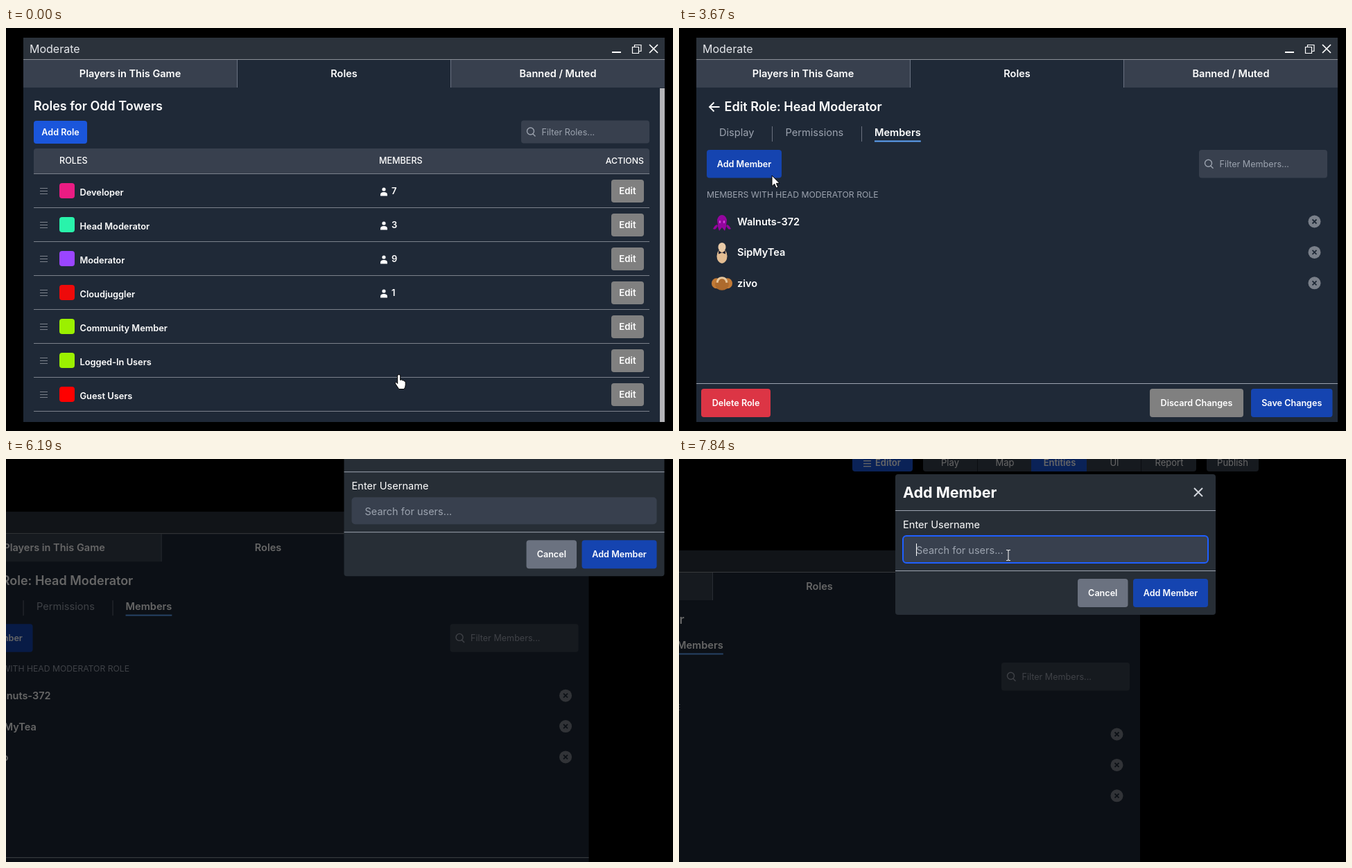
These frames come from a looping animation (962x582 px, 8 s). An HTML page with a canvas:

```html
<!DOCTYPE html>
<html lang="en">
<head>
<meta charset="utf-8">
<title>Moderate</title>
<style>
html, body { margin: 0; height: 100%; overflow: hidden; background: #000; }
canvas { display: block; }
</style>
</head>
<body>
<canvas id="stage" width="962" height="582"></canvas>
<script>
const c = document.getElementById('stage').getContext('2d');
const PANEL = '#1f2937', FIELD = '#38404e', GRAY = '#9ca3af', BLUE = '#1544b0', BTN = '#808080', MINT = '#29f3ab';

// ---- drawing helpers ----
function rect(x, y, w, h, fill) { c.fillStyle = fill; c.fillRect(x, y, w, h); }

function box(x, y, w, h, fill, r = 4, stroke, lw = 1) {
  c.beginPath();
  c.roundRect(x, y, w, h, r);
  c.fillStyle = fill;
  c.fill();
  if (stroke) { c.strokeStyle = stroke; c.lineWidth = lw; c.stroke(); }
}

function text(s, x, y, size, weight = 400, fill = '#fff', align = 'left') {
  c.font = `${weight} ${size}px Inter, Roboto, sans-serif`;
  c.textAlign = align;
  c.fillStyle = fill;
  c.fillText(s, x, y);
}

function path(d, stroke, lw = 1.5, fill) {
  const p = new Path2D(d);
  if (fill) { c.fillStyle = fill; c.fill(p); }
  if (stroke) { c.strokeStyle = stroke; c.lineWidth = lw; c.stroke(p); }
}

function oval(x, y, rx, ry, fill) {
  c.beginPath();
  c.ellipse(x, y, rx, ry, 0, 0, 7);
  c.fillStyle = fill;
  c.fill();
}

function at(x, y, draw) { c.save(); c.translate(x, y); draw(); c.restore(); }

function button(label, x, y, w, h, fill, size = 12.6) {
  box(x, y, w, h, fill);
  text(label, x + w / 2, y + h / 2 + 4.6, size, 600, '#fff', 'center');
}

function filter(label, x, y, h) {
  box(x, y, 185, h, FIELD);
  at(x + 14, y + h / 2, () => path('M4.5-1A5 5 0 1 1-5.5-1A5 5 0 1 1 4.5-1M3 3L6.5 6.5', GRAY, 1.4));
  text(label, x + 29.5, y + h / 2 + 4.6, 12.6, 400, GRAY);
}

// ---- window ----
function frame() {
  rect(25, 14, 925, 555, PANEL);
  rect(25, 14, 925, 31, '#2b323b');
  text('Moderate', 34, 36, 16, 400, '#e5e7eb');
  rect(874, 34, 13, 2, '#fff');
  path('M906.5 27V24.5H916V33.5H913M903.5 27.5H912.5V36.5H903.5Z', '#fff', 1.2);
  path('M928 24L940 36M940 24L928 36', '#fff', 1.7);
  rect(25, 45, 925, 1, '#8b9097');
  rect(25, 46, 308, 40, FIELD);
  rect(642, 46, 308, 40, FIELD);
  rect(333, 46, 1, 40, '#687080');
  rect(641, 46, 1, 40, '#687080');
  text('Players in This Game', 179, 71, 14.5, 600, '#fff', 'center');
  text('Roles', 487.5, 71, 14.5, 600, '#fff', 'center');
  text('Banned / Muted', 796, 71, 14.5, 600, '#fff', 'center');
}

const roles = [
  ['Developer', '#ea1c83', 7], ['Head Moderator', MINT, 3], ['Moderator', '#9a45ff', 9],
  ['Cloudjuggler', '#ee0a0a', 1], ['Community Member', '#9bf000'],
  ['Logged-In Users', '#9bf000'], ['Guest Users', '#ff0000']
];

function roleList() {
  text('Roles for Odd Towers', 40, 119, 18, 600);
  button('Add Role', 40, 134, 77, 33, '#1a56db');
  filter('Filter Roles...', 743, 133.5, 33);
  box(40, 174, 888, 36, FIELD, [4, 4, 0, 0]);
  text('ROLES', 77, 196, 12.6, 500);
  text('MEMBERS', 538, 196, 12.6, 500);
  text('ACTIONS', 920, 196, 12.3, 500, '#fff', 'right');
  rect(40, 210, 888, 1, '#7b818b');
  roles.forEach(([name, color, count], i) => at(0, 49 * i, () => {
    for (const y of [231, 235, 239]) rect(49, y, 11, 1, '#7b818b');
    box(77, 224, 22, 22, color);
    text(name, 106.5, 241.5, 12.8, 600);
    if (count) {
      oval(545, 233, 2.6, 2.6, '#fff');
      path('M540 242.5V240.5Q540 237 545 237T550 240.5V242.5Z', 0, 0, '#fff');
      text(count, 556, 240, 13, 600);
    }
    button('Edit', 873, 219, 47, 33, BTN, 13.2);
    rect(40, 259, 888, 1, '#7b818b');
  }));
  rect(943, 87, 7, 482, '#b4b4b8');
}

function editHead(active, tabs, seps) {
  path('M58.5 114H44M50.5 107.5L44 114L50.5 120.5', '#fff', 1.8);
  text('Edit Role: Head Moderator', 65.5, 120, 18, 600);
  ['Display', 'Permissions', 'Members'].forEach((s, i) => {
    const on = i === active;
    text(s, tabs[i], 155.5, 14.6, on ? 600 : 400, on ? '#fff' : GRAY);
    if (on) rect(tabs[i], 162.5, c.measureText(s).width, 2, '#60a5fa');
  });
  for (const x of seps) rect(x, 142, 1, 22, '#6b7280');
  rect(25, 513, 925, 1, GRAY);
  button('Delete Role', 32, 521, 100, 41, '#dc3545');
  button('Discard Changes', 679, 521, 135, 41, BTN);
  button('Save Changes', 825, 521, 117.5, 41, BLUE);
}

function displayTab() {
  editHead(0, [58, 156.5, 285.5], [137, 266]);
  text('Role Name', 43.5, 190, 12.5);
  box(40.5, 199.5, 894, 33.5, FIELD, 4, '#6b7280');
  text('Head Moderator', 52, 221, 14.2);
  text('Role Color', 43.5, 262, 12.5);
  box(40.5, 270.5, 894, 33.5, FIELD, 4, '#6b7280');
  box(40.5, 270.5, 41, 33.5, '#6b7280', [4, 0, 0, 4]);
  rect(81, 270, 1.5, 34, '#e5e7eb');
  box(51.5, 278.5, 19, 18, MINT, 0, '#c8ccd2');
  text('#29f3ab', 94.5, 292, 14.4);
}

const members = ['Walnuts-372', 'SipMyTea', 'zivo'];
const avatars = [
  () => {
    path('M-13 10Q-9 13-6 5L-7-3Q-5-10 0-10T7-3L6 5Q9 13 13 10Q10 4 7 4L4 13L0 8L-4 13L-7 4Q-10 4-13 10Z', 0, 0, '#94069f');
    oval(-3, 0, 1.2, 2, '#d84be0');
    oval(3, 0, 1.2, 2, '#d84be0');
  },
  () => {
    oval(0, 5, 7.5, 10.5, '#e3bd92');
    oval(0, -8, 5.5, 6.5, '#e9cba8');
    path('M-5-3L0 0L5-3V2L0 0L-5 2Z', 0, 0, '#252432');
  },
  () => {
    oval(-8, 0, 7, 7.5, '#c27a36');
    oval(8, 0, 7, 7.5, '#c27a36');
    oval(0, 1, 10, 9, '#ad6a2d');
    path('M-7-1Q-6-8 0-8T7-1', '#e7c69b', 3);
  }
];

function membersTab() {
  editHead(2, [58, 153.5, 282], [134, 263]);
  button('Add Member', 40, 176, 108, 40.5, BLUE);
  filter('Filter Members...', 750, 176, 40.5);
  text('MEMBERS WITH HEAD MODERATOR ROLE', 40, 245, 12.2, 400, GRAY);
  members.forEach((name, i) => at(0, 44.4 * i, () => {
    at(62, 280, avatars[i]);
    text(name, 84, 285, 14.5, 600);
    oval(916.5, 279.5, 9, 9, '#7a808a');
    path('M913.5 276.5L919.5 282.5M919.5 276.5L913.5 282.5', PANEL, 1.8);
  }));
}

// Strip of buttons above the window, reached only by panning
function toolbar() {
  box(535, -132, 87, 32, '#1a56db');
  for (const y of [-116, -112, -108]) rect(551, y, 11, 1.3, '#fff');
  text('Editor', 568, -108, 13, 600);
  box(637, -132, 394, 32, FIELD);
  rect(793, -132, 80, 32, '#1a56db');
  rect(715, -132, 1, 32, '#1b212b');
  rect(951, -132, 1, 32, '#1b212b');
  ['Play', 'Map', 'Entities', 'UI', 'Report'].forEach((s, i) =>
    text(s, 676 + 79 * i, -108, 13, i === 2 ? 600 : 400, '#fff', 'center'));
  box(1046, -132, 75, 32, FIELD);
  text('Publish', 1083.5, -108, 13, 400, '#fff', 'center');
}

function modal(focused) {
  box(597, -96, 462, 203, '#272e36');
  text('Add Member', 608, -62, 21.5, 700);
  path('M1028-76L1040-64M1040-76L1028-64', '#d1d5db', 2);
  rect(597, -44, 462, 1, GRAY);
  text('Enter Username', 608, -18, 14.6);
  box(608, -7, 440, 39, FIELD, 5, focused && '#1f5fff', 2);
  text('Search for users...', 627, 18.5, 14.5, 400, GRAY);
  if (focused) rect(627, 4, 1, 18, '#fff');
  rect(597, 43, 462, 1, GRAY);
  button('Cancel', 860, 55, 72.5, 41, '#6b7280');
  button('Add Member', 940, 55, 108, 41, BLUE);
}

// ---- motion ----
const pan = [
  [5310, 0, 0], [5850, -43.5, 37], [5920, -46, 38], [6050, -46, 38],
  [6470, -235, 110], [6870, -285, 118]
];
const mouse = [
  [0, 567, 501], [380, 455, 302], [640, 455, 302], [990, 440, 284], [1400, 440, 284],
  [1800, 365, 200], [2170, 286, 134], [2220, 286, 134], [2320, 292, 146], [2420, 292, 146],
  [2820, 835, 237], [3260, 174, 190], [3670, 134, 213], [3920, 134, 213],
  [4130, 490, 103], [4290, 600, 20], [4430, 505, 225], [4580, 605, 385], [4740, 774, 531],
  [5160, 956, 575], [6870, 938, 560], [7300, 640, 260], [7640, 474, 148],
  [7740, 474, 148], [7840, 475, 139]
];
// [from ms, cursor shape]
const shapes = [
  [0, 'hand'], [640, 'beam'], [1450, 'arrow'], [2070, 'hand'], [2450, 'arrow'], [4790, ''],
  [5160, 'arrow'], [5210, ''], [6920, 'arrow'], [7590, 'beam']
];
const cursors = {
  arrow: () => path('M0 0V15.5L3.7 12.2L6.2 18L8.8 16.8L6.3 11.3H11Z', '#000', 1, '#fff'),
  hand: () => path('M-2 2Q-2 0 0 0T2 2V8Q4 6.5 5 8.5Q7 7.5 7.6 9.6Q9.5 9 9.5 11.5V15Q9.5 18 7.5 21H0L-5 13.5Q-6 11-4 11L-2 13Z', '#000', 1, '#fff'),
  beam: () => path('M-3-7.5H-1L0-6.5L1-7.5H3M0-6.5V6.5M-3 7.5H-1L0 6.5L1 7.5H3', '#e8e8e8', 1.1)
};

function along(keys, t) {
  const i = keys.findIndex(k => k[0] > t);
  if (i === 0) return keys[0].slice(1);
  if (i < 0) return keys[keys.length - 1].slice(1);
  const [t0, x0, y0] = keys[i - 1], [t1, x1, y1] = keys[i];
  const p = (t - t0) / (t1 - t0);
  return [x0 + (x1 - x0) * p, y0 + (y1 - y0) * p];
}

function draw(t) {
  const [dx, dy] = along(pan, t), open = t >= 3720;
  rect(0, 0, 962, 582, '#000');
  at(dx, dy, () => {
    if (open) toolbar();
    frame();
    if (t < 640) roleList();
    else if (t < 2220) displayTab();
    else membersTab();
  });
  if (open) {
    rect(0, 0, 962, 582, 'rgba(0,0,0,.6)');
    at(dx, dy, () => modal(t >= 7640));
  }
  if (t >= 6420 && t < 6520) {
    c.setLineDash([5, 4]);
    path('M5 0V582', '#c8c8c8', 1);
    c.setLineDash([]);
  }
  const shape = shapes.filter(s => s[0] <= t).pop()[1];
  if (shape) at(...along(mouse, t), cursors[shape]);
}

const start = performance.now();
function tick() {
  draw((performance.now() - start) % 8000);
  requestAnimationFrame(tick);
}
tick();
</script>
</body>
</html>
```
